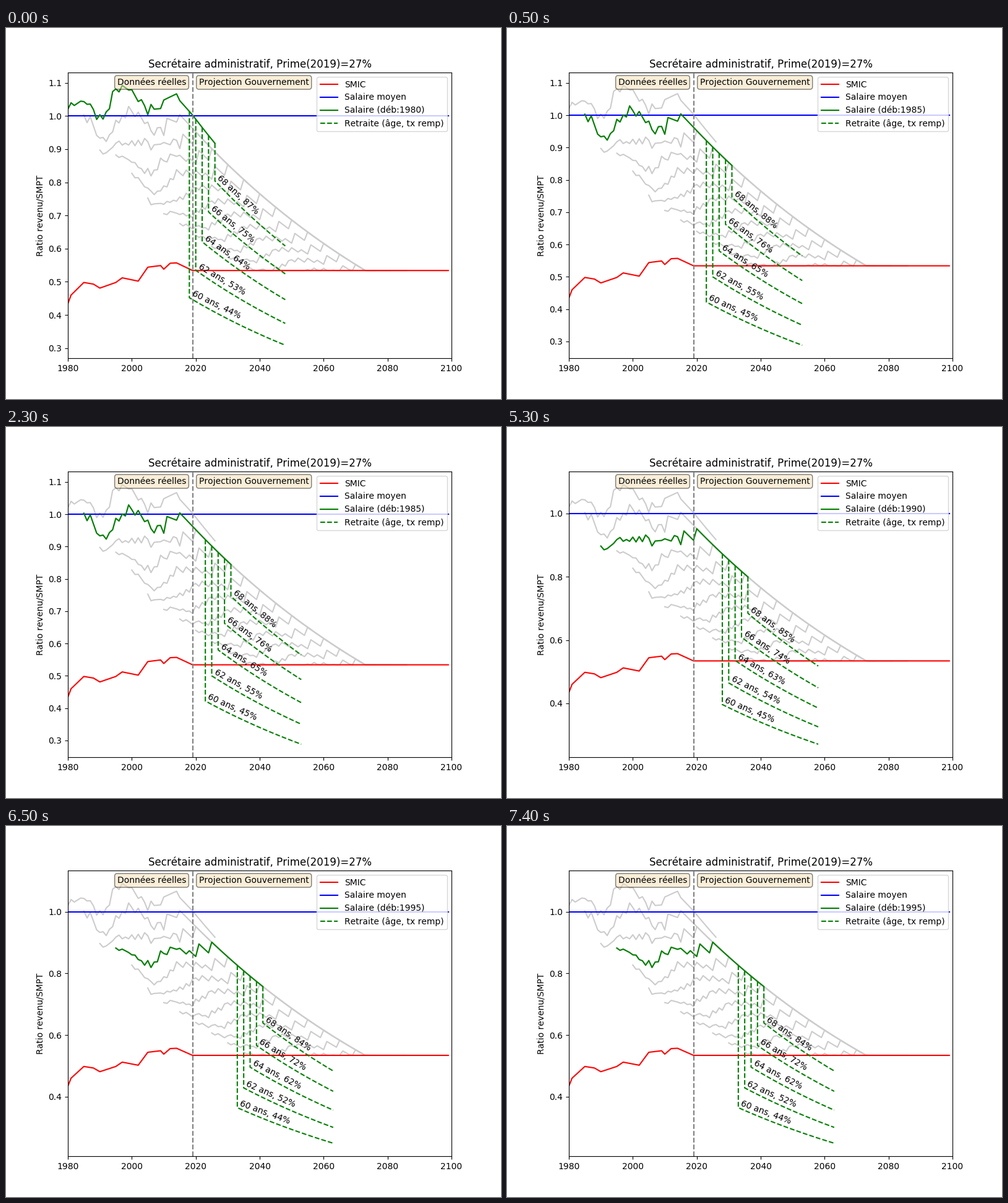
Recreate the animation shown at these times as a matplotlib script. Size 800 by 600 pixels, loop 8000 ms.

```python
import numpy as np
import matplotlib.pyplot as plt
from matplotlib.animation import FuncAnimation
from matplotlib.ticker import MultipleLocator

plt.rcParams["font.family"] = "DejaVu Sans"
plt.rcParams["text.kerning_factor"] = 6  # kern by whole pixels

STARTS = range(1980, 2045, 5)
AGES = range(60, 70, 2)
START_AGE, END_AGE = 22, 90

# Turning points (year, value), relative to the average wage
SMIC = [(1980, .434), (1981, .460), (1985, .498), (1988, .493), (1990, .481),
        (1995, .498), (1997, .512), (2002, .502), (2005, .544), (2009, .549),
        (2010, .538), (2012, .556), (2014, .557), (2019, .534)]
TOP = [(1980, 1.516), (1981, 1.545), (1982, 1.506), (1984, 1.525),
       (1986, 1.456), (1987, 1.457), (1990, 1.333), (1992, 1.298),
       (1994, 1.322), (1996, 1.300), (1997, 1.283), (1999, 1.267),
       (2000, 1.229), (2004, 1.148), (2006, 1.088), (2007, 1.073),
       (2009, 1.075), (2010, 1.048), (2014, 1.032), (2015, 1.004),
       (2019, .9625)]
BONUS = [(2010, 1), (2015, 1.042), (2019, 1.042), (2026, 1.029)]

# Promotions: (years of service, share of the top salary)
STEPS = [(0, .673), (2, .685), (5, .700), (6, .711), (8, .720), (10, .753),
         (12, .780), (14, .812), (15, .825), (17, .851), (20, .878),
         (23, .898), (26, .951), (30, 1)]

# Replacement rate as a quadratic in the retirement age, by first year
RATES = {1980: (.0045, .0885, .4415), 1985: (.0033, .0922, .4535),
         1990: (.0035, .0856, .4495), 1995: (.0039, .0842, .4365)}


def follow(points, x):
    return np.interp(x, *zip(*points))


def top_salary(years):
    return follow(TOP, years) * np.exp(-.0109 * np.maximum(years - 2019, 0))


def scale(service):
    at, level = map(np.array, zip(*STEPS))
    return level[np.searchsorted(at, service, side="right") - 1]


def salary(start, years):
    value = scale(years - start) * top_salary(years)
    if start == STARTS[0]:
        value = value * follow(BONUS, years)
    return np.maximum(value, SMIC[-1][1])


def career(start):
    years = np.arange(start, start + AGES[-1] - START_AGE + 1)
    return years, salary(start, years)


def draw_pension(start, age):
    first = start + age - START_AGE
    years = np.arange(first, start + END_AGE - START_AGE + 1)
    rate = np.polyval(RATES[start], (age - AGES[0]) / 2)
    last = salary(start, first)
    values = 1.01 * rate * last * np.exp(-.0127 * (years - first))
    ax.plot(np.r_[first, years], np.r_[last, values], "g--",
            label="Retraite (âge, tx remp)" if age == AGES[0] else None)
    return years, values, f"{age} ans, {rate:.0%}"


def draw_label(years, values, text):
    ends = ax.transData.transform([(years[0], values[0]), (years[-1], values[-1])])
    dx, dy = ends[1] - ends[0]
    ax.text(years[0] + .6, values[0] + .007, text,
            rotation=np.degrees(np.arctan2(dy, dx)),
            rotation_mode="anchor", ha="left", va="baseline")


def draw_banner(year, text, side):
    ax.text(year, .9654, text, ha=side, va="center",
            transform=ax.get_xaxis_transform(),
            bbox=dict(boxstyle="round", facecolor="wheat", alpha=.5))


def draw(i):
    start = 1980 + 5 * ((i + 5) // 6)
    ax.clear()
    for s in STARTS:
        ax.plot(*career(s), color="0.8")
    years = np.arange(1980, 2100)
    ax.plot(years, follow(SMIC, years), color="red", label="SMIC")
    ax.plot(years, np.ones(len(years)), color="blue", label="Salaire moyen")
    ax.plot(*career(start), color="green", label=f"Salaire (déb:{start})")
    pensions = [draw_pension(start, age) for age in AGES]
    ax.axvline(2019, color="grey", ls="--")

    ax.set_xlim(1980, 2100)
    ax.set_ylim(ax.get_ylim())
    ax.yaxis.set_major_locator(MultipleLocator(.1 if start < 1990 else .2))
    for pension in pensions:
        draw_label(*pension)
    draw_banner(2017, "Données réelles", "right")
    draw_banner(2021, "Projection Gouvernement", "left")
    ax.set_title("Secrétaire administratif, Prime(2019)=27%")
    ax.set_ylabel("Ratio revenu/SMPT")
    ax.legend(loc="upper right")
    return []


fig, ax = plt.subplots(figsize=(8, 6), dpi=100)
anim = FuncAnimation(fig, draw, frames=16, init_func=lambda: [],
                     interval=500, repeat=True, repeat_delay=0)
plt.show()
```
